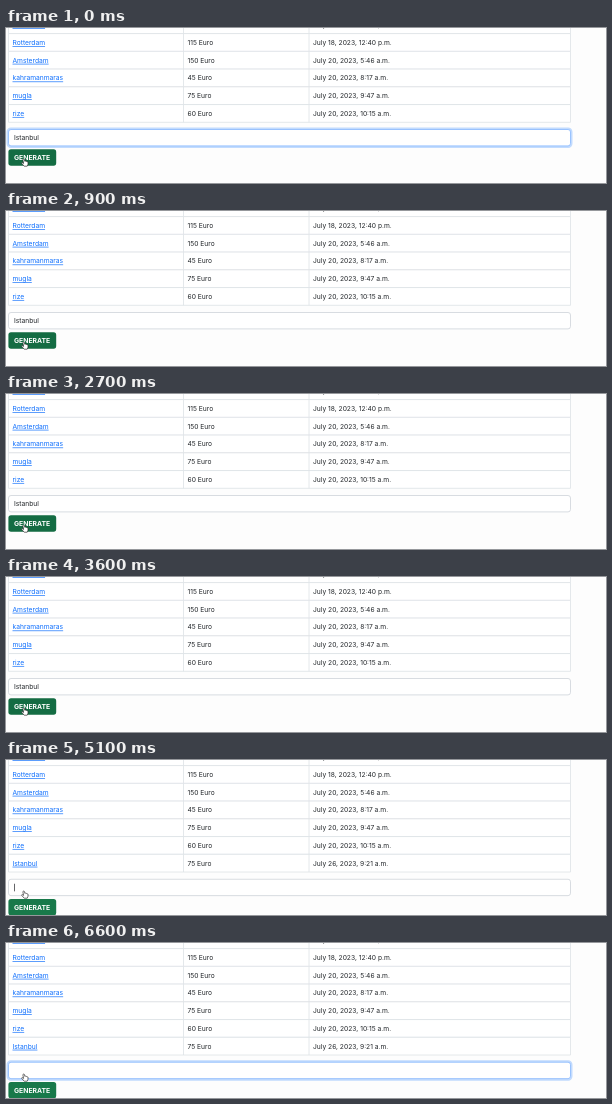
Write an HTML page that moves like this. It is 600x155 px and loops after 7000 ms.

```html
<!DOCTYPE html>
<html lang="en">
<head>
<meta charset="utf-8">
<title>Price list</title>
<style>
  html, body { margin: 0; width: 100%; height: 100%; overflow: hidden; background: #fdfdfd; }
  svg { display: block; width: 600px; height: 155px; }
  text { font: 6.7px Inter, "Open Sans", sans-serif; fill: #212529; }
  .link { fill: #0d6efd; text-decoration: underline; }
  .label { font-size: 6.8px; font-weight: 700; fill: #fff; }
  .grid { stroke: #dee2e6; stroke-width: 0.8; fill: none; }
</style>
</head>
<body>
<svg viewBox="0 0 600 155">
  <g id="table"></g>
  <g id="form">
    <rect id="ring" x="1.6" y="100.6" width="563.8" height="18.2" rx="3.2" fill="none" stroke="#c2dbfe" stroke-width="2.2"/>
    <rect id="field" x="2.5" y="101.5" width="562" height="16.4" rx="2.5" fill="#fff" stroke-width="0.8"/>
    <text id="entry" x="8" y="112.2">Istanbul</text>
    <path id="caret" d="M8.5 106v7.6" stroke="#212529" stroke-width="0.7"/>
    <rect id="button" x="2.4" y="121.3" width="47.8" height="16.4" rx="2.6"/>
    <text class="label" x="8" y="132">GENERATE</text>
  </g>
  <path d="M17.2 131.2c.6-.5 1.2-.1 1.3.5l.3 1.6c.5-.4 1-.2 1.2.2.5-.3 1-.1 1.1.4.6-.2 1 .1 1 .8l-.2 1.9-.7 1.6h-3l-2.4-2.7c-.5-.7.3-1.2.9-.7l.9.6-.7-3.4z"
    fill="#fff" stroke="#222" stroke-width="0.65" stroke-linejoin="round"/>
</svg>
<script>
  const LOOP = 7000, ADDED = 5100, ROW = 17.74, TOP = 5.6;
  const COLUMNS = [2.5, 177.5, 303, 564.5];
  const ROWS = [
    ["Rotterdam", "115 Euro", "July 18, 2023, 12:38 p.m."],
    ["Rotterdam", "115 Euro", "July 18, 2023, 12:40 p.m."],
    ["Amsterdam", "150 Euro", "July 20, 2023, 5:46 a.m."],
    ["kahramanmaras", "45 Euro", "July 20, 2023, 8:17 a.m."],
    ["mugla", "75 Euro", "July 20, 2023, 9:47 a.m."],
    ["rize", "60 Euro", "July 20, 2023, 10:15 a.m."],
    ["Istanbul", "75 Euro", "July 26, 2023, 9:21 a.m."]
  ];
  const $ = id => document.getElementById(id);
  const show = (id, on) => $(id).setAttribute("visibility", on ? "visible" : "hidden");

  function rowMarkup(cells, i) {
    const top = TOP + (i - 1) * ROW, bottom = top + ROW;
    const lines = COLUMNS.map(x => `M${x} ${top}V${bottom}`).join("");
    const texts = cells.map((cell, c) =>
      `<text class="${c ? "" : "link"}" x="${COLUMNS[c] + 4}" y="${top + 11.4}">${cell}</text>`);
    return `<g id="row${i}"><rect x="2.5" y="${top}" width="562" height="${ROW}" fill="#fff"/>` +
      `<path class="grid" d="${lines}M2.5 ${top}H564.5M2.5 ${bottom}H564.5"/>${texts.join("")}</g>`;
  }
  $("table").innerHTML = ROWS.map(rowMarkup).join("");

  function focusAt(t) {
    if (t < 100) return 1;
    if (t < ADDED + 100) return 0;
    return t < ADDED + 200 ? 0.6 : 1;
  }

  function render(t) {
    const added = t >= ADDED, focus = focusAt(t);
    show("row6", added);
    show("entry", !added);
    show("caret", added && (t < 5600 || (t >= 6100 && t < 6600)));
    $("form").setAttribute("transform", `translate(0 ${added ? ROW : 0})`);
    $("ring").setAttribute("opacity", focus);
    $("field").setAttribute("stroke", focus ? "#86b7fe" : "#ced4da");
    $("button").setAttribute("fill", added ? "#18794a" : "#146c43");
  }

  const start = performance.now();
  function tick() {
    render((performance.now() - start) % LOOP);
    requestAnimationFrame(tick);
  }
  tick();
</script>
</body>
</html>
```
